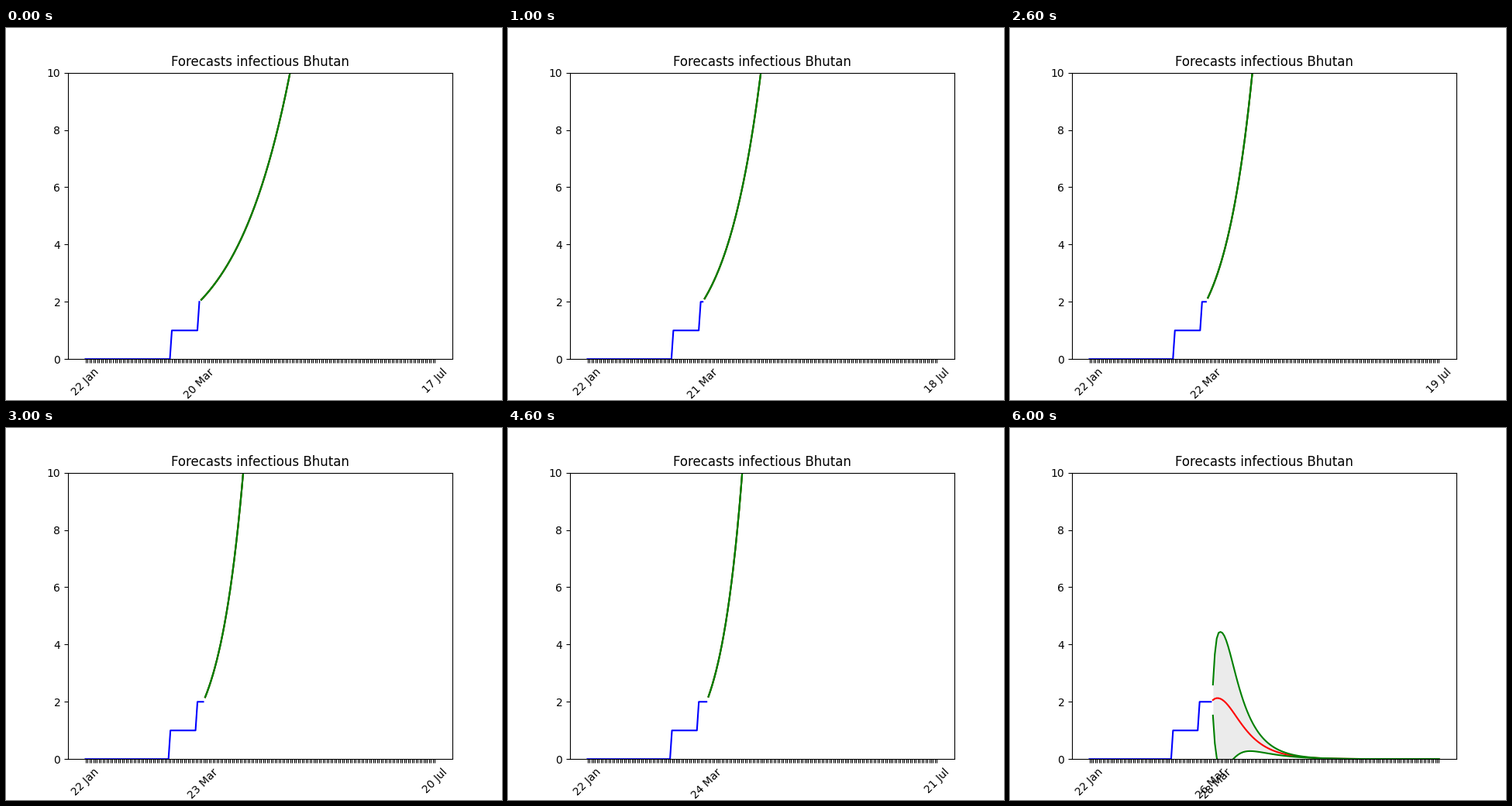
These frames come from a looping animation (640x480 px, 7000 ms). A matplotlib script:

```python
import numpy as np
import matplotlib.pyplot as plt
from matplotlib.animation import FuncAnimation

START = np.datetime64("2020-01-22")
FIRST_CASE, SECOND_CASE = 44, 58   # days since START
HORIZON = 120
# Days for the early forecasts to grow from 2 to 10
GROWTH_DAYS = [46.2, 29.8, 23.9, 20.7, 18.6]

fig, ax = plt.subplots(figsize=(6.4, 4.8), dpi=100)


def date_label(day):
    return (START + int(day)).item().strftime("%d %b")


def bell(t, peak, mid, rate, k, lead=1.24):
    """Epidemic wave whose tail decays at the given daily rate."""
    dt = t - mid
    dt = np.where(dt < 0, dt * lead, dt)
    return peak * np.cosh(k * dt) ** (-rate / k)


def forecast(i, t):
    """Mean and upper bound of the forecast made on day i."""
    d = t - t[0]
    if i < len(GROWTH_DAYS):
        mean = 2 * 5 ** ((d + 1) / GROWTH_DAYS[i])
        return mean, mean
    if i == 5:
        mean = bell(t, 2.71, 73.1, 0.09, 0.045)
        rise = 14 - 10.48 * 0.702 ** d
        return mean, np.where(d < 16, rise, bell(t, 11.1, 79.7, 0.116, 0.058))
    mean = bell(t, 2.13, 67.3, 0.09, 0.0908)
    rise = 4.44 - 1.84 * (1 - d / 4) ** 3
    return mean, np.where(d < 4, rise, bell(t, 4.44, 69, 0.1, 0.16))


def draw(i):
    today = SECOND_CASE + i
    end = today + HORIZON
    past = np.arange(today + 1)
    ahead = np.arange(today + 1, end + 1)
    cases = (past >= FIRST_CASE).astype(int) + (past >= SECOND_CASE)
    mean, upper = forecast(i, ahead)
    lower = 2 * mean - upper

    ax.clear()
    ax.fill_between(ahead, lower, upper, color="k", alpha=0.08, linewidth=0)
    ax.plot(past, cases, "b")
    ax.plot(ahead, mean, "r")
    ax.plot(ahead, lower, "g")
    ax.plot(ahead, upper, "g")

    labels = [""] * (end + 1)
    labels[0] = date_label(0)
    labels[today] = date_label(today)
    peak = ahead[np.argmax(mean)]
    labels[peak] = date_label(peak - 1)
    ax.set_xticks(range(end + 1), labels, rotation=45)
    ax.set_xlim(-0.05 * end, 1.05 * end)
    ax.set_ylim(0, 10)
    ax.set_title("Forecasts infectious Bhutan")


anim = FuncAnimation(fig, draw, frames=7, init_func=lambda: None,
                     interval=1000, repeat=True, repeat_delay=0)
plt.show()
```
